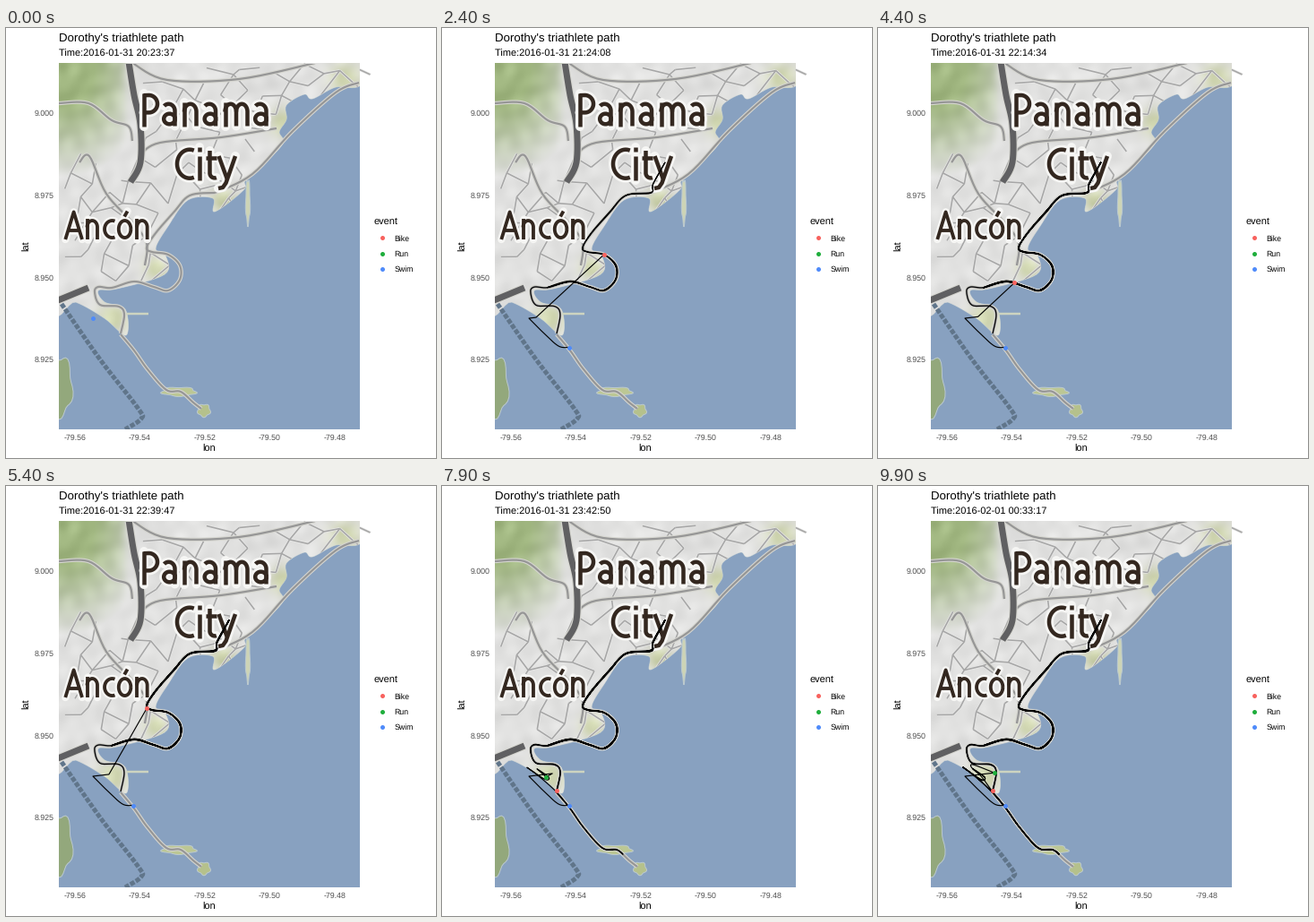
These frames come from a looping animation (480 px wide and 480 px high, 10 s). A matplotlib script:

```python
import matplotlib.pyplot as plt
import numpy as np
from matplotlib.animation import FuncAnimation
from matplotlib.collections import LineCollection
from matplotlib.patches import Polygon, Rectangle

FRAMES = 100
START = np.datetime64("2016-01-31T20:23:37")
DURATION = 14980  # seconds from first to last frame
PT = 0.72         # points per pixel at 100 dpi
STEP = 8          # curve samples per vertex
COLORS = {"Bike": "#F8625E", "Run": "#1FAE3C", "Swim": "#4F8BFA"}

plt.rcParams.update({"font.family": ["Liberation Sans", "DejaVu Sans"],
                     "text.hinting": "none"})
rng = np.random.default_rng(7)
fig = plt.figure(figsize=(4.8, 4.8), dpi=100, facecolor="white")
ax = fig.add_axes([0, 0, 1, 1])
ax.axis("off")


def smooth(pts):
    """Catmull-Rom curve through the points, STEP samples per segment."""
    p = np.array(pts, float)
    q = np.vstack([p[0], p, p[-1]])
    u = np.arange(STEP)[:, None] / STEP
    parts = []
    for a, b, c, d in zip(q, q[1:], q[2:], q[3:]):
        parts.append(b + 0.5 * u * (c - a + u * (2*a - 5*b + 4*c - d
                                                 + u * (3*(b - c) + d - a))))
    return np.vstack(parts + [p[-1:]])


def stroke(pts, color, width, z, cap="butt", **kw):
    line, = ax.plot(*np.transpose(pts), color=color, lw=width * PT, zorder=z,
                    solid_capstyle=cap, solid_joinstyle="round", **kw)
    line.set_clip_path(panel)


def area(pts, color, z=2):
    shape = Polygon(pts, fc=color, ec="#bccad0", lw=0.7, zorder=z)
    ax.add_patch(shape)
    shape.set_clip_path(panel)
    return shape


def arc(cx, cy, rx, ry, a, b):
    t = np.radians(np.linspace(a, b, 40))
    return np.c_[cx + rx * np.cos(t), cy + ry * np.sin(t)]


def island(cx, cy, rx, ry, color):
    ripple = 1 + 0.12 * np.sin(np.linspace(0, 10 * np.pi, 40))[:, None]
    area((cx, cy) + arc(0, 0, rx, ry, 0, 360) * ripple, color)


def road(pts, color="#969696", width=2.2, z=4):
    line = smooth(pts)
    stroke(line, "#d6d6d0", width + 2.2, z)
    stroke(line, color, width, z + 0.1)


def text(x, y, s, px, color="black", **kw):
    kw.setdefault("va", "baseline")
    return ax.text(x, y, s, size=px * PT, color=color, zorder=20, **kw)


# ---- routes
RIDE = [(128, 341), (132, 320), (126, 311), (105, 309), (99, 295), (103, 289),
        (118, 290), (143, 283), (165, 289), (181, 293), (194, 281), (194, 265),
        (181, 253), (163, 250), (157, 245), (167, 229), (187, 206), (205, 187),
        (233, 184), (236, 174), (249, 150)]
PIER = [(128, 342), (143, 360), (158, 381), (179, 404), (195, 406), (202, 411)]
TOWN = [(107, 323), (95, 314), (115, 328), (119, 325), (106, 316)]
SWIM = [(97, 324), (113, 340), (130, 355), (142, 356.5)]


class Leg:
    """A route whose keys tell at which time each listed vertex is passed."""

    def __init__(self, pts, keys, jitter=0.0):
        pts = np.array(pts, float)
        self.xy = smooth(pts + rng.normal(0, 1, pts.shape) * jitter)
        dist = np.r_[0, np.cumsum(np.hypot(*np.diff(self.xy, axis=0).T))]
        marks = dist[[i * STEP for i in keys.values()]]
        self.time = np.interp(dist, marks, list(keys))

    def trail(self, t):
        if t < self.time[0]:
            return np.empty((0, 2))
        head = [np.interp(t, self.time, c) for c in self.xy.T]
        return np.vstack([self.xy[self.time < t], head])


shuttle = RIDE[-2:5:-1] + RIDE[7:]  # from the far end back to town and out again
lap = PIER + PIER[-2::-1] + TOWN
bike = Leg(RIDE + 3 * shuttle + RIDE[-2::-1],
           {8.7: 0, 11: 7, 24: 40, 38.6: 76, 44.2: 89, 59: 124}, 0.35)
run = Leg(lap + [(116, 325)] + lap + [(106, 311), (130, 320)],
          {61.4: 0, 64: 2, 67.2: 5, 79: 16, 87: 22, 99: 34}, 0.2)
swim = Leg(SWIM, {0: 0, 7.8: 3})
legs = {"Bike": bike, "Run": run, "Swim": swim}

# ---- land and sea
panel = Rectangle((59, 39.5), 335.5, 408.5, fc="#88A1C0", ec="none", zorder=0)
ax.add_patch(panel)
COAST = [(420, 30), (396, 64), (368, 66), (342, 79), (333, 74), (313, 86),
         (313, 102), (305, 116), (309, 129), (285, 154), (267, 170), (265, 181),
         (233, 205), (231, 190), (203, 192), (181, 221), (167, 246), (178, 254),
         (177, 275), (124, 291), (103, 293), (110, 306), (133, 314), (134, 343),
         (110, 324), (78, 306), (50, 301), (50, 30)]
land = area(smooth(COAST), "#dedede")


def terrain():
    y, x = np.mgrid[39:448, 59:395].astype(float)
    relief = sum(np.sin(x * a + y * b + c) for a, b, c in rng.normal(0, 0.16, (14, 3)))
    rgb = np.array([225, 225, 224.]) + 1.3 * relief[..., None]

    def blend(w, color):
        nonlocal rgb
        w = np.clip(w, 0, 1)[..., None]
        rgb = rgb * (1 - w) + (np.array(color) + 2.2 * relief[..., None]) * w

    hills = 1.5 - 1.3 * np.hypot((x - 65) / 85, (y - 45) / 105)
    blend(hills / (1 + np.exp((x - 133) / 3)), (156, 178, 124))
    for cx, cy, r in [(242, 192, 14), (167, 268, 13), (120, 323, 17),
                      (309, 105, 15), (378, 56, 17)]:
        blend(1.1 * np.exp(-((x - cx)**2 + (y - cy)**2) / r**2), (207, 213, 176))
    return np.clip(rgb, 0, 255).astype(np.uint8)


ax.imshow(terrain(), extent=(59, 395, 448, 39), aspect="auto",
          zorder=3).set_clip_path(land)
island(270, 194, 2.5, 25, "#cdd4b6")
island(193, 406, 19, 5, "#bcc794")
island(221, 427, 7, 7, "#b5c18c")
island(60, 400, 14, 33, "#93a87c")
stroke([(133, 319), (159, 319)], "#cdd4c0", 2.5, 4)
stroke(smooth([(62, 308), (105, 370), (147, 424), (151, 436), (133, 448)]),
       "#60758a", 5, 4, ls=(0, (1.05, 0.35)))


def street_grid(size=21):
    """Joints of a skewed, shaken grid, each linked to two neighbours."""
    i, j = np.mgrid[-6:16, -6:16]
    node = np.stack([180 + size * (0.9 * i - 0.5 * j), 140 + size * (0.4 * i + 0.9 * j)], -1)
    node = node - (45, 90) + rng.normal(0, 4.5, node.shape)
    links = np.vstack([np.stack([node[:-1], node[1:]], 2).reshape(-1, 2, 2),
                       np.stack([node[:, :-1], node[:, 1:]], 2).reshape(-1, 2, 2)])
    x, y = links.mean(1).T
    inside = (links[..., 1].min(1) > 40) & (links[..., 0].min(1) > 60) & (y < 285)
    town = (x > 150) | (y > 150)
    return links[inside & town & (rng.random(len(links)) < 0.62)]


links = street_grid()
for color, width, z in [("#e9e9e8", 3, 3.5), ("#a6a6a6", 1.6, 3.6)]:
    streets = LineCollection(links, colors=color, linewidths=width * PT, zorder=z)
    ax.add_collection(streets)
    streets.set_clip_path(land)

road([(59, 84), (92, 84), (118, 103), (137, 110), (141, 126)])
road([(82, 150), (93, 143), (112, 185), (142, 218), (157, 240), (155, 265)])
road([(150, 141), (172, 128), (240, 122), (302, 112)])
road([(141, 39), (180, 58), (260, 57), (345, 39)])
road([(233, 184), (275, 163), (320, 115), (368, 72), (394, 61)])
road(RIDE[:-2])
road(PIER[:-1] + [(209, 418), (218, 425)])
road([(137, 38), (143, 75), (150, 108), (150, 150), (139, 172)], "#606062", 7, 5)
road([(58, 304), (92, 290)], "#606062", 7, 5)


# ---- map labels: pen strokes of a narrow hand, y up from the baseline
def pen(*parts):
    return np.vstack(parts)


def arch(x, w=13.5):
    return pen(arc(x + w / 2, 16, w / 2, 8.7, 180, 0), (x + w, 0))


STEM = pen((3, 0), (3, 27))
GLYPHS = {  # advance width, then strokes
    "P": (23, pen((3, 0), (3, 36.5)),
          pen((3, 34.3), arc(9, 24.8, 9.5, 9.7, 90, -90), (3, 15.1))),
    "C": (25, arc(17, 18.3, 14, 16, 70, 290)),
    "A": (27, pen((1.5, 0), (12.5, 36), (23.5, 0)), pen((5.5, 12), (19.5, 12))),
    "a": (22.5, pen(arc(8, 17, 7, 7.7, 135, 0), (15, 0)), arc(9, 8, 6.3, 5.8, 0, 360)),
    "c": (18.5, arc(13, 13.5, 10, 11.2, 70, 290)),
    "i": (9, STEM, pen((3, 32), (3, 37))),
    "m": (34, STEM, arch(3, 12.5), arch(15.5, 12.5)),
    "n": (23, STEM, arch(3)),
    "ó": (24, arc(11, 13.5, 8, 11.2, 0, 360), pen((10.5, 30), (14.5, 37))),
    "t": (14, pen((5.5, 33), arc(11, 8, 5.5, 5.4, 180, 290)), pen((0.5, 24.7), (13, 24.7))),
    "y": (22, pen((1.5, 27), (11, 1)), pen((20, 27), (9.5, -3), (6, -8), (1, -9))),
}


def label(word, x, base, scale=1.0):
    for ch in word:
        advance, *strokes = GLYPHS[ch]
        for s in strokes:
            pts = s * (scale, -scale) + (x, base)
            stroke(pts, "#f6f6f4", 10 * scale, 6, "round")
            stroke(pts, "#33271f", 4.5 * scale, 7)
        x += advance * scale


label("Panama", 150.5, 109.5)
label("City", 188, 170)
label("Ancón", 65, 236, 0.85)

# ---- titles, axes, legend
GREY = "#4D4D4D"
text(59, 15, "Dorothy's triathlete path", 13.2)
clock = text(59, 32, "", 11)
for i in range(4):
    text(54, 95 + 91.7 * i, f"{9 - 0.025 * i:.3f}", 8.8, GREY, ha="right",
         va="center_baseline")
for i in range(5):
    text(77 + 72.4 * i, 460, f"{-79.56 + 0.02 * i:.2f}", 8.8, GREY, ha="center")
text(226.8, 473, "lon", 11, ha="center")
text(23, 243.5, "lat", 11, ha="center", va="center", rotation=90)
text(411, 219, "event", 11)
dots = {}
for i, (name, color) in enumerate(COLORS.items()):
    style = dict(marker="o", ls="", ms=5 * PT, mew=0, color=color, zorder=12)
    y = 234.3 + 17.2 * i
    ax.plot([419.7], [y], **style)
    text(433.5, y + 3.2, name, 8.8)
    dots[name], = ax.plot([], [], **style)

track, = ax.plot([], [], color="black", lw=1.15 * PT, zorder=10,
                 solid_capstyle="butt", solid_joinstyle="round")
ax.set(xlim=(0, 480), ylim=(480, 0))


def draw(frame):
    u = frame / (FRAMES - 1)
    clock.set_text("Time:" + str(START + int(u * DURATION)).replace("T", " "))
    trails = {name: leg.trail(frame) for name, leg in legs.items()}
    # the join slides from the swim start to the run finish
    join = (1 - u) * swim.xy[0] + u * run.xy[-1]
    track.set_data(*np.vstack([trails["Bike"], trails["Run"], join, trails["Swim"]]).T)
    for name, trail in trails.items():
        dots[name].set_data(*trail[-1:].T)
    return [track, clock, *dots.values()]


anim = FuncAnimation(fig, draw, frames=FRAMES, interval=100, repeat=True)
plt.show()
```
